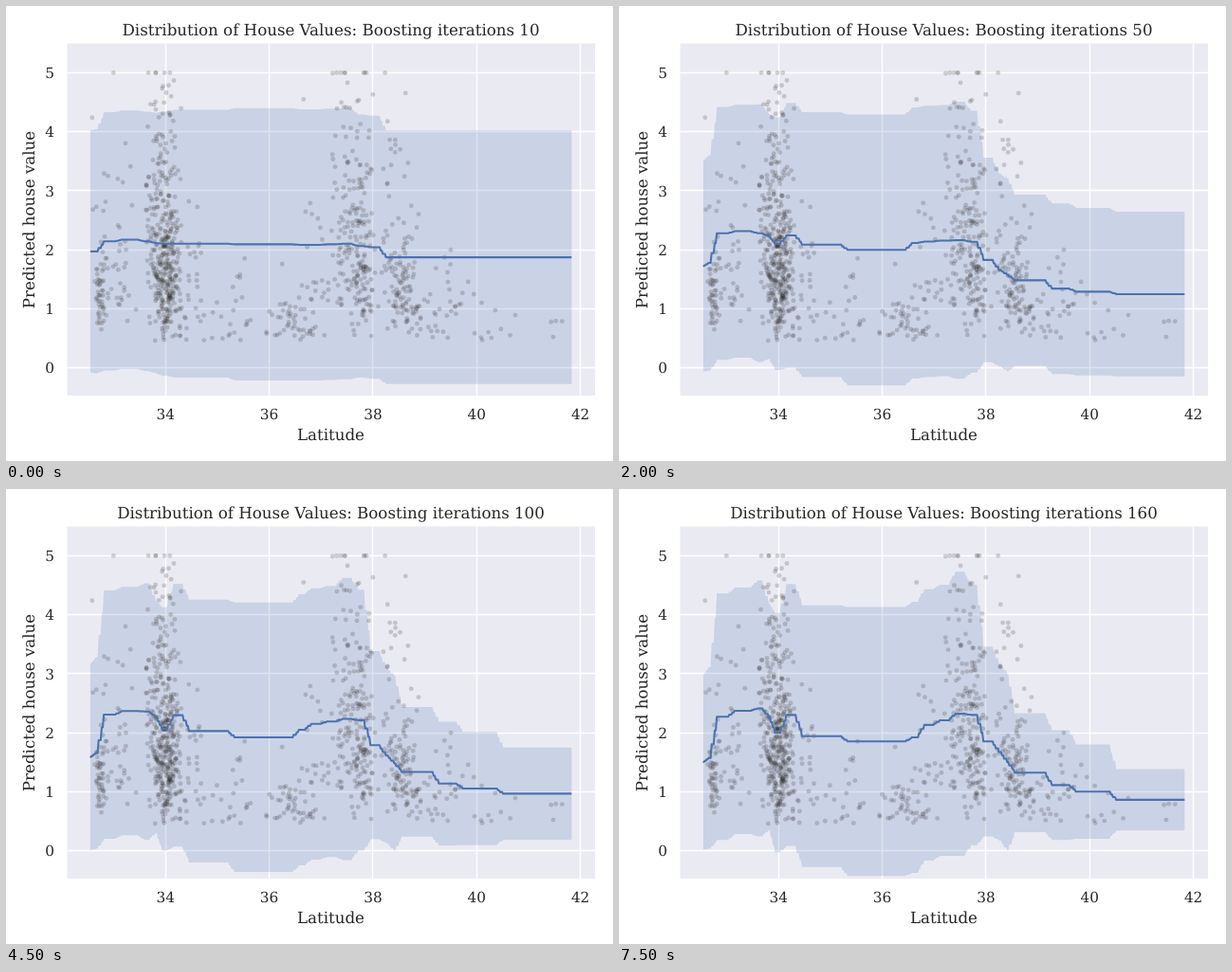
Recreate the animation shown at these times as an HTML page. Size 640 px wide and 480 px high, loop 8 s.

```html
<!DOCTYPE html>
<html lang="en">
<head>
<meta charset="utf-8">
<title>Distribution of House Values</title>
<style>
  html, body { margin: 0; width: 100%; height: 100%; overflow: hidden; background: #fff; }
  svg { display: block; }
  text {
    font-family: "DejaVu Serif", "Noto Serif", serif; font-size: 16.67px; fill: #262626;
    text-anchor: middle; text-rendering: geometricPrecision;
  }
  .tick { font-size: 15.28px; }
  .ytick { text-anchor: end; }
  .grid { stroke: #fff; stroke-width: 1.39; fill: none; }
  #band { fill: #4c72b0; fill-opacity: .2; }
  #dots { fill: #2f2926; fill-opacity: .2; }
  #mean { fill: none; stroke: #4c72b0; stroke-width: 2.08; stroke-linejoin: round; }
</style>
</head>
<body>
<svg width="640" height="480" viewBox="0 0 640 480">
  <defs><clipPath id="clip"><rect x="64.5" y="39.5" width="556.5" height="371.5"/></clipPath></defs>
  <rect x="64.5" y="39.5" width="556.5" height="371.5" fill="#eaeaf2"/>
  <g id="axes"></g>
  <g clip-path="url(#clip)">
    <path id="band"/>
    <g id="dots"></g>
    <path id="mean"/>
  </g>
  <text id="title" x="342.5" y="31"></text>
  <text x="342.5" y="458">Latitude</text>
  <text transform="translate(30 225.5) rotate(-90)">Predicted house value</text>
</svg>
<script>
const STEP = 500, STATES = 16;
const WEST = 32.55, EAST = 41.84, CAP = 5;
const $ = id => document.getElementById(id);
const px = lat => 168.2 + (lat - 34) * 54.68;
const py = val => 381.4 - val * 62.2;
const snap = v => Math.floor(v) + .5;
const clamp = v => Math.min(1, Math.max(0, v));

function add(parent, tag, attrs, text) {
  const el = document.createElementNS("http://www.w3.org/2000/svg", tag);
  for (const k in attrs) el.setAttribute(k, attrs[k]);
  if (text !== undefined) el.textContent = text;
  parent.append(el);
}

// Axes
for (let lat = 34; lat <= 42; lat += 2) {
  add($("axes"), "path", { class: "grid", d: `M${snap(px(lat))} 39.5V411` });
  add($("axes"), "text", { class: "tick", x: px(lat), y: 436.3 }, lat);
}
for (let val = 0; val <= 5; val++) {
  add($("axes"), "path", { class: "grid", d: `M64.5 ${snap(py(val))}H621` });
  add($("axes"), "text", { class: "tick ytick", x: 51, y: py(val) + 5.7 }, val);
}

// Scatter: log-normal values around each region, capped at the top
let seed = 7;
const rand = () => (seed = (seed * 16807) % 2147483647) / 2147483647;
const gauss = () => Math.sqrt(-2 * Math.log(rand())) * Math.cos(2 * Math.PI * rand());

// count, latitude, its spread, median value, log spread
const regions = [
  [55, 32.75, .08, 1.4, .38], [35, 33.1, .2, 1.6, .5],
  [300, 34.05, .13, 1.75, .5], [110, 33.8, .1, 2.1, .48], [25, 34.5, .15, 1.5, .6],
  [28, 35.4, .45, .85, .5], [45, 36.5, .27, .75, .3], [25, 37, .22, 1.6, .6],
  [75, 37.42, .13, 2.6, .42], [140, 37.78, .12, 1.95, .48],
  [85, 38.58, .15, 1.3, .36], [40, 38.35, .18, 2, .4],
  [35, 39.2, .3, 1, .4], [18, 40.4, .7, .75, .35]
];
for (const [count, lat, spread, median, logSpread] of regions) {
  for (let i = 0; i < count;) {
    const g = gauss(), x = lat + g * spread, val = median * Math.exp(gauss() * logSpread);
    if (Math.abs(g) > 2.2 || x < WEST || x > EAST || val < .45) continue;
    add($("dots"), "circle", { cx: px(x).toFixed(1), cy: py(Math.min(CAP, val)).toFixed(1), r: 2.45 });
    i++;
  }
}

// Plateaus of the fitted curve: latitude, first value, quick change, slow change
const meanKeys = [
  [32.55, 1.97, -.29, -.19], [32.7, 1.97, -.2, -.2], [32.86, 2.14, .23, -.1], [33.2, 2.17, .2, 0],
  [33.63, 2.14, .15, .12], [33.85, 2.11, .16, 0], [33.96, 2.1, .06, -.16], [34.2, 2.1, .2, 0],
  [34.5, 2.1, .06, -.22], [35.37, 2.09, -.07, -.17], [36.62, 2.08, .17, -.33], [36.85, 2.08, .1, -.05],
  [37.15, 2.09, .07, .05], [37.45, 2.1, 0, .22], [37.75, 2.06, .02, .22], [38, 2.04, -.37, .18],
  [38.29, 1.87, -.37, .17], [38.45, 1.87, -.45, .08], [38.6, 1.87, -.55, 0], [39.31, 1.87, -.74, -.02],
  [39.78, 1.87, -.79, -.08], [40.55, 1.87, -.8, -.21]
];
// The same for the half height of the band
const spreadKeys = [
  [32.55, 2.05, 0, -.57], [32.7, 2.07, 0, -.53], [32.86, 2.19, 0, -.1], [33.63, 2.2, 0, -.03],
  [33.85, 2.21, 0, -.29], [33.96, 2.24, 0, -.21], [34.2, 2.27, 0, -.05], [35.37, 2.31, 0, -.03],
  [36.62, 2.3, 0, 0], [37.45, 2.3, 0, .11], [37.75, 2.23, 0, -.02], [38, 2.23, -.84, .22],
  [38.29, 2.15, -.87, .22], [38.6, 2.15, -.69, -.45], [39.31, 2.15, -.56, -.66],
  [39.78, 2.15, -.42, -.93], [40.55, 2.15, 0, -1.63]
];

const easeOut = (u, power) => 1 - (1 - u) ** power;

// Each plateau is reached by a short ramp of three stairs
function stairs(keys, lat, u, slowPower) {
  const height = ([, start, quick, slow]) => start + quick * easeOut(u, 4) + slow * easeOut(u, slowPower);
  let val = height(keys[0]);
  for (let i = 1; i < keys.length; i++) {
    const end = keys[i][0], ramp = Math.min(.15, end - keys[i - 1][0]);
    const part = Math.ceil(clamp((lat - end + ramp) / ramp) * 3) / 3;
    val += (height(keys[i]) - height(keys[i - 1])) * part;
  }
  return val;
}

const path = pts => "M" + pts.map(([lat, val]) => px(lat).toFixed(2) + " " + py(val).toFixed(2)).join("L");

function render(state) {
  const u = state / (STATES - 1), mid = [], top = [], bottom = [];
  for (let lat = WEST; lat <= EAST; lat += .02) {
    const m = stairs(meanKeys, lat, u, 1), s = stairs(spreadKeys, lat, u, 2);
    mid.push([lat, m]);
    top.push([lat, m + s]);
    bottom.unshift([lat, m - s]);
  }
  $("title").textContent = `Distribution of House Values: Boosting iterations ${(state + 1) * 10}`;
  $("band").setAttribute("d", path(top.concat(bottom)) + "Z");
  $("mean").setAttribute("d", path(mid));
}

let shown = -1;
function draw() {
  const state = Math.floor(performance.now() / STEP) % STATES;
  if (state !== shown) render(shown = state);
  requestAnimationFrame(draw);
}
draw();
</script>
</body>
</html>
```
